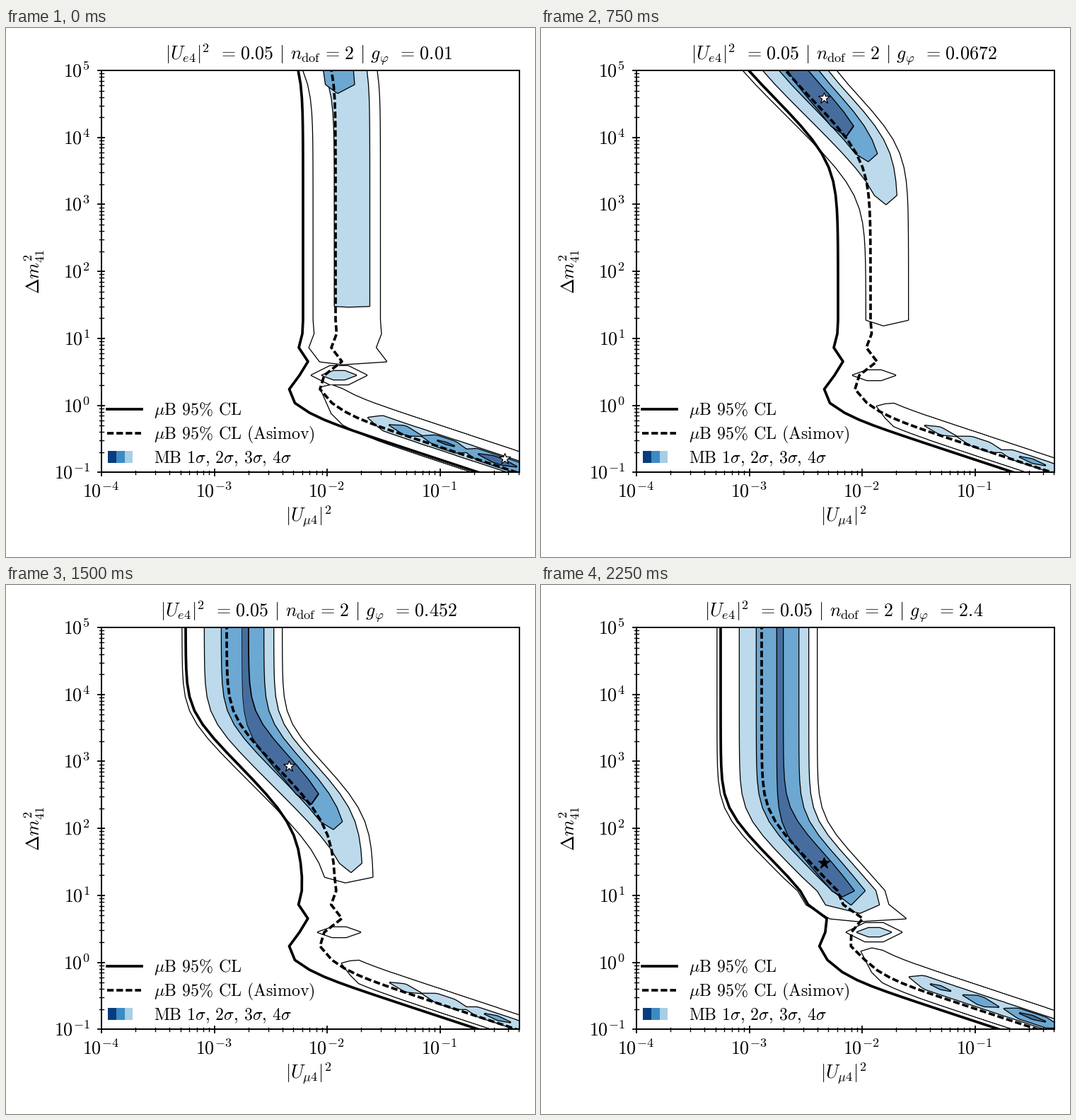
These frames come from a looping animation (748 by 748 pixels, 2500 ms). A matplotlib script:

```python
import numpy as np
import matplotlib.pyplot as plt
from matplotlib.animation import FuncAnimation
from matplotlib.collections import PolyCollection
from matplotlib.patches import Rectangle

SIZE, DPI = 748, 100
PX = 72 / DPI                      # points per pixel
X0, X1, Y0, Y1 = 135, 726, 60, 628.3
DECADE_X, DECADE_Y = 159.6, (Y1 - Y0) / 6
CELL_X, ROW = (X1 - X0) / 29, (Y1 - Y0) / 29   # 30 by 30 sampling grid
STEPS = [0, 3, 5, 8, 11, 13, 16, 19, 21, 23]
SLOPE = 20                         # sideways pixels per row between the bends

plt.rcParams["mathtext.fontset"] = "cm"

# An edge is (x of the upper plateau, x of the lower plateau, row of the upper bend).
# It slides down by one row per step.
SOLID, DASH = (254, 420, 38.85), (312, 466, 38.5)
TUBES = {
    4: ((249.5, 460, 38.65), (390, 519, 38.1)),
    3: ((281, 490, 38.45), (378, 504, 38.1)),
    2: ((305, 480, 38.4), (364, 484, 38.15)),
    1: ((334, 445, 37.2), (342, 465, 38.6)),
}
TIP = {4: 0, 3: 27.35, 2: 30.45, 1: 32.3}        # lowest row of each tube
TIP_DROP = {4: 0, 3: 11, 2: 2.2, 1: 2.2}
# Oscillation of the limits at low mass, rows 5 to 11.
SOLID_WIGGLE = [-11.5, -19.5, -5, 7, -6, -1, 0]
DASH_WIGGLE = [-5, -22, -16, 9, -6, 1.5, 0]
SOLID_END, DASH_END = 668, 722                   # where the tails leave the axes
# Valley at the lower right: lenses around three peaks, wider for higher levels.
PEAKS = [(565, -8), (622, 3), (695, 18)]
LENS = {4: (98, -5, 16), 3: (30, -6.5, 6.5), 2: (0, -7, 5), 1: (-22, -8, 3)}


def row_y(row):
    return Y1 - ROW * np.asarray(row, float)


def soft(z, width):
    return width * np.logaddexp(0, z / width)


def edge(spec, u, spread=0):
    top, low, knee = spec
    bend = knee - (low + spread - top) / SLOPE
    return top + SLOPE * (soft(knee - u, 1) - soft(bend - u, 1.3))


def wiggle(rows, sizes):
    return np.interp(rows, range(5, 12), sizes)


def phases(step):
    """How far the low-mass solution is favoured early and late in the scan."""
    return max(0, 1.4 - step / 3), max(0, (step - 17) / 6)


def tail_y(x, end, start):
    """Sloping line to the bottom axis that begins steeply on row 5."""
    line = lambda v: Y1 - 0.33 * (end - v)
    return line(x) - (line(start) - row_y(5)) * np.exp(-(x - start) / 25)


def limit_curve(spec, sizes, end, step):
    rows = np.arange(30, 4, -1)
    x = edge(spec, rows + step) + wiggle(rows, sizes)
    end -= 20 * phases(step)[1] ** 4
    tail = np.linspace(x[-1], 760, 18)[1:]
    return np.r_[x, tail], np.r_[row_y(rows), tail_y(tail, end, x[-1])]


def tube(level, step):
    early, late = phases(step)
    floor = 10.6 - 2.8 * min(max(early, late), 1) + 0.6 * (4 - level)
    tip = max(TIP[level] - TIP_DROP[level] * early - step, floor)
    rows = np.r_[np.arange(32, tip, -1), tip]
    left, right = (edge(spec, rows + step, spread * early) + wiggle(rows, DASH_WIGGLE)
                   for spec, spread in zip(TUBES[level], (-18, 7)))
    left[-1] = 0.6 * left[-1] + 0.4 * right[-1]
    y = row_y(rows)
    return np.column_stack([np.r_[left, right[-2::-1]], np.r_[y, y[-2::-1]]])


def lens(level, center, half_width, strength):
    _, middle, thick = LENS[level]
    x = np.linspace(center - half_width, center + half_width, 16)
    taper = np.minimum(1, (half_width - abs(x - center)) / 20)
    half = thick * (1 + 0.4 * strength) * min(1, half_width / 30) * taper
    y = tail_y(x, DASH_END, DASH[1] + DASH_WIGGLE[0]) + middle
    return np.column_stack([np.r_[x, x[::-1]], np.r_[y - half, (y + half)[::-1]]])


def island(half_width, half_height):
    x = 471 + half_width * np.array([-1, -1 / 3, 1 / 3, 1, 1 / 3, -1 / 3])
    return np.column_stack([x, 491 + half_height * np.array([0, -1, -1, 0, 1, 1])])


def contours(level, step):
    strength = max(phases(step))
    grow = min(strength, 1)
    shapes = [tube(level, step)]
    for center, width in PEAKS:
        half_width = width + LENS[level][0] + 22 * strength
        if half_width > 4:
            shapes.append(lens(level, center, half_width, strength))
    if level == 4:
        shapes.append(island(30 + 9 * grow, 7 + 6 * grow))
    elif level == 3 and grow:
        shapes.append(island(24 * grow, 6 * grow))
    return shapes


def star_position(step):
    if step == 0:
        return 705.5, 609
    # The best fit rides down with the tube, or along the top axis before that.
    return X0 + CELL_X * (13 + max(0, 6 - step)), row_y(min(35 - step, 29))


def title_text(step):
    gap, eq = r"\hspace{0.38}", r"\hspace{0.11}=\hspace{0.11}"
    g = f"{10 ** (-2 + 3 * step / 29):.3g}"
    bar = gap + "|" + gap
    return (rf"$|U_{{e4}}|^2{gap}{eq}0.05{bar}n_{{\mathrm{{dof}}}}{eq}2"
            rf"{bar}g_\varphi{gap}{eq}{g}$")


fig = plt.figure(figsize=(SIZE / DPI, SIZE / DPI), dpi=DPI, facecolor="white")
ax = fig.add_axes([0, 0, 1, 1])
ax.set(xlim=(0, SIZE), ylim=(SIZE, 0))
ax.axis("off")


def label(x, y, text, size=26, **kw):
    return ax.text(x, y, text, fontsize=size * PX, **{"va": "baseline", **kw})


def tick(x, y, major, vertical):
    reach = 4.5 if major else 2.7
    dx, dy = (0, reach) if vertical else (reach, 0)
    ax.plot([x - dx, x + dx], [y - dy, y + dy], "k",
            lw=(1.8 if major else 1.4) * PX, zorder=6)


box = Rectangle((X0, Y0), X1 - X0, Y1 - Y0, fill=False, lw=2 * PX, zorder=6)
ax.add_patch(box)

# Axes
for k in range(7):
    y = Y1 - k * DECADE_Y
    label(118.5, y + 9.5, rf"$10^{{{k - 1}}}$", ha="right")
    for m in range(1, 10 if k < 6 else 2):
        tick(X0, y - DECADE_Y * np.log10(m), m == 1, False)
for k in range(4):
    x = X0 + k * DECADE_X
    label(x - 1, 664, rf"$10^{{{k - 4}}}$", ha="center")
    for m in range(1, 10 if k < 3 else 6):
        tick(x + DECADE_X * np.log10(m), Y1, m == 1, True)
label(428, 699, r"$|U_{\mu 4}|^2$", ha="center")
label(40, 344.5, r"$\Delta m^2_{41}$", rotation=90, ha="center", va="center")
title = label(428, 46, "", ha="center")

# Legend
BLUES = [plt.cm.Blues(v)[:3] for v in (0.95, 0.65, 0.35)]
THICK = dict(color="black", lw=3.7 * PX)
DASHED = dict(THICK, ls=(0, (2.5, 1.05)))
ax.plot([143, 192], [538.5] * 2, **THICK)
ax.plot([143.5, 191.5], [572.5] * 2, **DASHED)
for i, color in enumerate(BLUES):
    ax.add_patch(Rectangle((144 + 11.8 * i, 598), 11.8, 16.5, fc=color, lw=0))
SPACE, COMMA = r"\hspace{0.38}", r",\hspace{0.18}"
MICRO = rf"\mu\mathrm{{B}}{SPACE}95\%{SPACE}\mathrm{{CL}}"
label(209, 547, f"${MICRO}$", 23.9)
label(209, 581, rf"${MICRO}{SPACE}\mathrm{{(Asimov)}}$", 23.9)
sigmas = COMMA.join(rf"{i}\sigma" for i in range(1, 5))
label(209, 615, rf"$\mathrm{{MB}}{SPACE}{sigmas}$", 23.9)

# Each level is stroked first and filled on top, so touching shapes merge.
layers = {}
for level in (4, 3, 2, 1):
    face = "white" if level == 4 else [0.25 + 0.75 * c for c in BLUES[level - 1]]
    depth = 1.9 - level / 10
    stroke = PolyCollection([], facecolors="black", edgecolors="black",
                            linewidths=2.6 * PX, joinstyle="round", zorder=depth)
    fill = PolyCollection([], facecolors=[face], linewidths=0, zorder=depth + 0.05)
    layers[level] = stroke, fill
    for part in layers[level]:
        ax.add_collection(part, autolim=False)
        part.set_clip_path(box)
solid, = ax.plot([], [], zorder=4, **THICK)
dashed, = ax.plot([], [], zorder=4, **DASHED)
star, = ax.plot([], [], "*", ms=16.5 * PX, mec="black", mew=1.2 * PX, zorder=5)
for artist in (solid, dashed, star):
    artist.set_clip_path(box)


def update(frame):
    step = STEPS[frame]
    for level, parts in layers.items():
        shapes = contours(level, step)
        for part in parts:
            part.set_verts(shapes)
    solid.set_data(*limit_curve(SOLID, SOLID_WIGGLE, SOLID_END, step))
    dashed.set_data(*limit_curve(DASH, DASH_WIGGLE, DASH_END, step))
    x, y = star_position(step)
    star.set_data([x], [y])
    star.set_markerfacecolor("black" if step == STEPS[-1] else "white")
    title.set_text(title_text(step))
    return [solid, dashed, star, title]


anim = FuncAnimation(fig, update, frames=len(STEPS), interval=250, repeat=True,
                     repeat_delay=0, blit=False)
plt.show()
```
